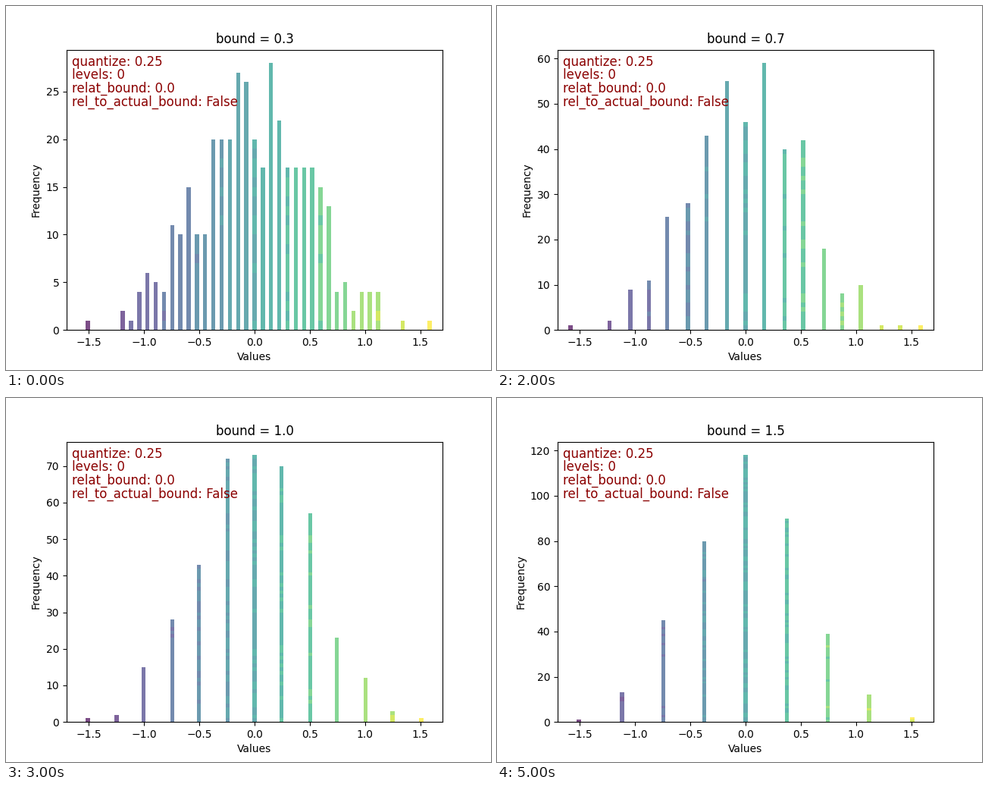
Animation, 640 px wide and 480 px high, one loop 6 s. Source, as a matplotlib script:

```python
import numpy as np
import matplotlib.pyplot as plt
from matplotlib.animation import FuncAnimation

COUNT = 400
QUANTIZE = 0.25
BOUNDS = [0.3, 0.5, 0.7, 1.0, 1.2, 1.5]
PITCH = 0.01863  # grid to which bar centres snap
TINTS = 12       # colour classes over the value range

# key points of the bell-shaped distribution: (samples below, value)
KNOTS = [
    (0, -1.785), (1, -1.235), (5, -1.055), (14, -0.9375), (23, -0.7875),
    (48, -0.6125), (59, -0.5625), (79, -0.4125), (139, -0.1875),
    (192, -0.0375), (219, 0.0625), (220, 0.0875), (257, 0.1875),
    (279, 0.2625), (347, 0.5625), (361, 0.6125), (362, 0.64),
    (375, 0.7125), (384, 0.8625), (387, 0.9625), (398, 1.16),
    (399, 1.54), (400, 1.64),
]

NOTES = [
    (79, f"quantize: {QUANTIZE}"),
    (96, "levels: 0"),
    (114, "relat_bound: 0.0"),
    (132, "rel_to_actual_bound: False"),
]


def stack(values):
    """Snapped bar centres and the height already piled below each sample."""
    keys = np.round(values / PITCH).astype(int)
    piled = {}
    bottoms = []
    for key in keys:
        bottoms.append(piled.get(key, 0))
        piled[key] = bottoms[-1] + 1
    return keys * PITCH, np.array(bottoms)


ranks, marks = zip(*KNOTS)
samples = np.interp(np.arange(COUNT) + 0.5, ranks, marks)
np.random.default_rng(4).shuffle(samples)

tint = np.floor((samples - 0.008) / 0.283) + TINTS // 2
colors = plt.cm.viridis(np.clip(tint / (TINTS - 1), 0, 1))

fig, ax = plt.subplots(figsize=(6.4, 4.8), dpi=100)


def draw(i):
    bound = BOUNDS[i]
    step = bound * QUANTIZE
    x, bottom = stack(np.round(samples / step) * step)
    ax.clear()
    ax.bar(x, 1, 2 * PITCH, bottom, color=colors, alpha=0.7, linewidth=0)
    ax.set_xlim(-1.7, 1.7)
    ax.set_ylim(0, (bottom.max() + 1) * 1.05)
    ax.set_title(f"bound = {bound}")
    ax.set_xlabel("Values")
    ax.set_ylabel("Frequency")
    for y, note in NOTES:
        ax.text(87.3 / 640, 1 - y / 480, note, transform=fig.transFigure,
                fontsize=12, color="darkred")
    return []


anim = FuncAnimation(fig, draw, frames=len(BOUNDS), interval=1000,
                     repeat=True, repeat_delay=0)
plt.show()
```
